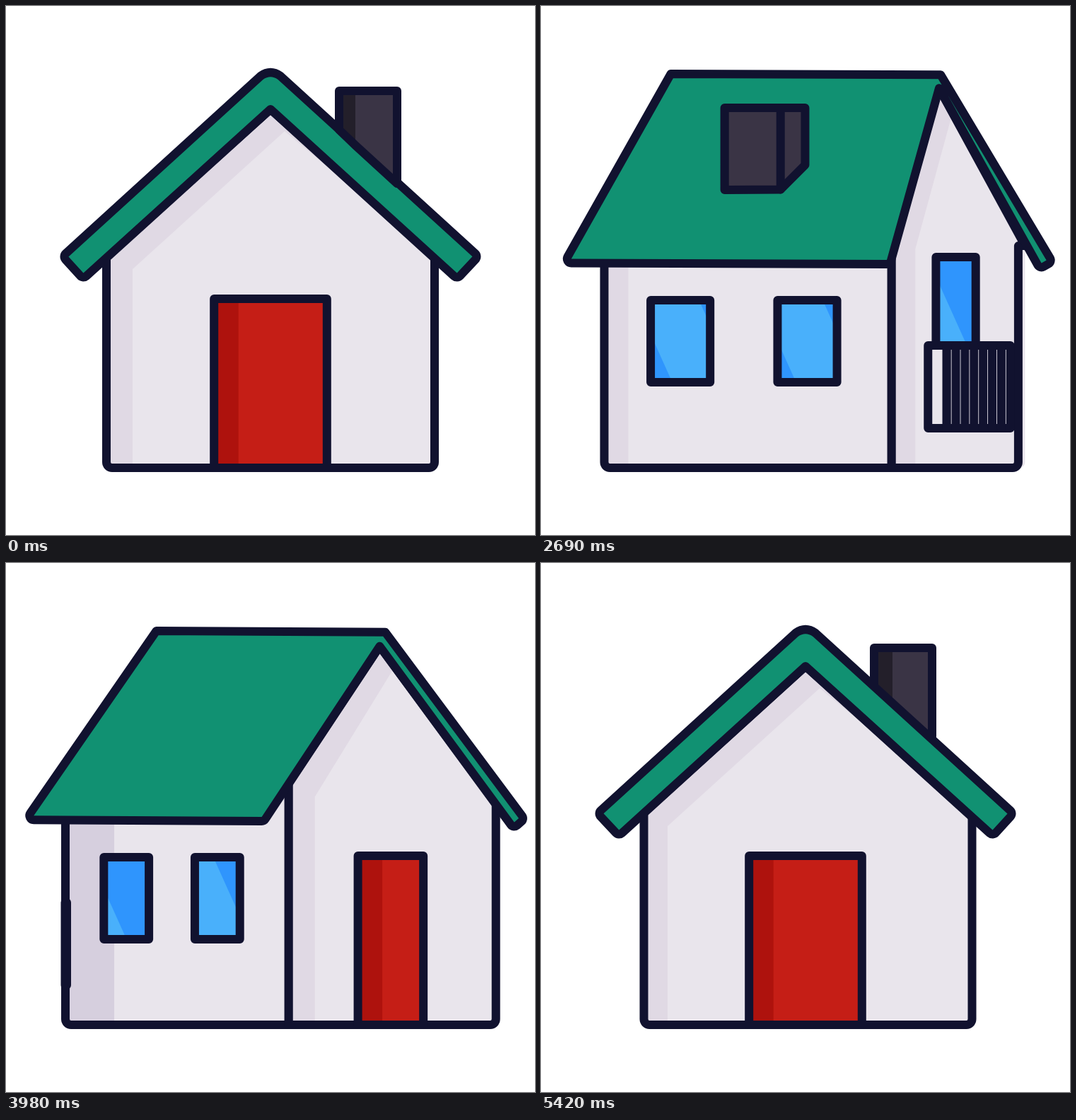
Recreate the animation shown at these times as an HTML page with a canvas. Size 748 by 748 pixels, loop 5.45 s.

```html
<!DOCTYPE html>
<html lang="en">
<head>
<meta charset="utf-8">
<title>Turning house</title>
<style>
html, body { margin: 0; width: 100%; height: 100%; overflow: hidden; background: #fff; }
canvas { display: block; }
</style>
</head>
<body>
<canvas id="stage" width="748" height="748"></canvas>
<script>
const SIZE = 748, LOOP = 5450, STEP = 30, HOLD = 2030, TURN = 3420;
const INK = '#11122f', WALL = '#e9e5ec', SHADE = '#e0d9e4', DEEP = '#d6cfde', GREEN = '#119172',
      RED = '#c51e16', DARK_RED = '#ae120d', BLUE = '#2f95fd', LIGHT_BLUE = '#49b0fb',
      BRICK = '#3a3445', DARK_BRICK = '#231f2a';
const BASE = 653, ROUND = 8;
const ctx = document.getElementById('stage').getContext('2d');

// Each point seen head-on, at an eighth turn and at a quarter turn
const POSES = {
  near:     [[142, 353], [52, 343], [101, 334]],
  nearTop:  [[142, 353], [52, 343], [79, 334]],
  corner:   [[606, 353], [366, 309], [102, 345]],
  far:      [[606, 361], [665, 361], [650, 361]],
  apex:     [[374, 146], [226, 118], [131, 114]],
  eaveOut:  [[80, 354], [13, 362], [41, 361]],
  eaveLow:  [[109, 386], [28, 376], [62, 366]],
  sideLow:  [[638, 386], [407, 365], [53, 365]],
  sideFar:  [[668, 354], [721, 363], [708, 364]],
  ridgeIn:  [[360, 99], [217, 98], [138, 96]],
  ridgeOut: [[388, 99], [530, 96], [610, 96]],
  ridgeMid: [[374, 89], [373.5, 97], [374, 96]],
  stackA:   [[471, 175], [406, 198], [333, 260]],
  stackB:   [[494, 197], [467, 259], [333, 260]],
  stackC:   [[553, 251], [544, 260], [415, 260]],
  stackTop: [[0, 120], [0, 144], [0, 144]]
};

const lerp = (a, b, k) => a + (b - a) * k;
const clamp = (x, lo = 0, hi = 1) => Math.max(lo, Math.min(hi, x));

function ease(x) {
  let lo = 0, hi = 1;
  for (let i = 0; i < 30; i++) {
    const s = (lo + hi) / 2, r = 1 - s;
    if (3 * r * r * s * .191 + 3 * r * s * s * .239 + s ** 3 < x) lo = s; else hi = s;
  }
  return 3 * lo * lo - 2 * lo ** 3;
}

function paint(fill, stroke = true) {
  if (fill) { ctx.fillStyle = fill; ctx.fill(); }
  if (stroke) ctx.stroke();
}

// A point is [x, y] or [x, y, corner radius]
function poly(points, fill, stroke) {
  const [first] = points, last = points[points.length - 1];
  ctx.beginPath();
  ctx.moveTo((first[0] + last[0]) / 2, (first[1] + last[1]) / 2);
  points.forEach(([x, y, r = 0], i) => {
    const next = points[(i + 1) % points.length];
    ctx.arcTo(x, y, next[0], next[1], r);
  });
  ctx.closePath();
  paint(fill, stroke);
}

function box(l, t, r, b, fill, stroke) {
  poly([[l, t], [r, t], [r, b], [l, b]], fill, stroke);
}

function line(x1, y1, x2, y2) {
  ctx.beginPath();
  ctx.moveTo(x1, y1);
  ctx.lineTo(x2, y2);
  ctx.stroke();
}

// Glass with diagonal glints that drift as the house turns
function pane(l, t, r, b, turn) {
  ctx.save();
  ctx.beginPath();
  ctx.rect(l, t, r - l, b - t);
  ctx.clip();
  box(l, t, r, b, BLUE, false);
  const slant = y => (y - 422) * .45;
  for (let x = (95 + 32 * turn) % 175 - 175; x < SIZE; x += 175)
    poly([[x + slant(t), t], [x + 90 + slant(t), t], [x + 90 + slant(b), b], [x + slant(b), b]], LIGHT_BLUE, false);
  ctx.restore();
  box(l, t, r, b);
}

function door(l, r) {
  box(l, 414, r, BASE, RED, false);
  box(l, 414, Math.min(l + 34.5, r), BASE, DARK_RED, false);
  box(l, 414, r, BASE);
}

function balcony(l, r, dir, depth) {
  const root = dir < 0 ? r : l;
  l += dir * depth;
  r += dir * depth;
  box(root, 480, root + dir * depth, 597, WALL);
  box(l, 480, r, 597, WALL);
  for (let i = 1; i < 7; i++) line(lerp(l, r, i / 7), 480, lerp(l, r, i / 7), 597);
}

function roof(p) {
  const bend = (a, b) => ctx.arcTo(...a, ...b, 6);
  ctx.beginPath();
  ctx.moveTo(...p.ridgeIn);
  ctx.quadraticCurveTo(...p.ridgeMid, ...p.ridgeOut);
  bend(p.sideFar, p.sideLow);
  bend(p.sideLow, p.apex);
  ctx.lineTo(...p.apex);
  bend(p.eaveLow, p.eaveOut);
  bend(p.eaveOut, p.ridgeIn);
  ctx.closePath();
  paint(GREEN);
}

// turn counts quarter turns, 0 to 4
function draw(turn) {
  const second = turn >= 2, v = second ? turn - 2 : turn;
  const flip = v > 1, w = flip ? 2 - v : v;
  const half = clamp(w * 2), rest = clamp(w * 2 - 1);
  const showsBack = turn > 1 && turn <= 3;
  const drift = 7 * Math.max(0, turn - 3.5);
  const mirror = x => flip ? SIZE - x : x;
  const p = {};
  for (const name in POSES) {
    const [a, b, c] = POSES[name];
    const mix = i => w < .5 ? lerp(a[i], b[i], half) : lerp(b[i], c[i], rest);
    p[name] = [mirror(mix(0)), mix(1)];
  }
  const shift = q => [q[0] + drift, q[1]];
  const foot = (q, r) => [q[0], BASE, r];
  const near = shift(p.near), nearTop = shift(p.nearTop), far = shift(p.far);
  // The shared edge never passes the outer edge of the side
  const corner = drift ? [Math.max(p.corner[0], far[0]), p.corner[1]] : p.corner;

  ctx.fillStyle = '#fff';
  ctx.fillRect(0, 0, SIZE, SIZE);
  ctx.strokeStyle = INK;
  ctx.lineWidth = 12;
  ctx.lineJoin = ctx.lineCap = 'round';

  // Chimney behind the ridge
  if (second && w < .5) {
    const edge = 553 - 84 * w, top = 120 + 74 * w;
    const l = flip ? edge - 82 : SIZE - edge;
    box(l, top, l + 82, 245, BRICK, false);
    box(l, top, l + 26, 245, DARK_BRICK, false);
    box(l, top, l + 82, 245);
  }

  // Long side
  if (w > 0) {
    const sl = Math.min(corner[0], far[0]), sr = Math.max(corner[0], far[0]);
    const tone = second ? DEEP : SHADE;
    const side = [corner, far, foot(far, Math.min(ROUND, (sr - sl) / 2)), foot(corner)];
    const band = clamp(second ? 28 + 88 * Math.max(0, v - 1) : 34, 0, Math.max(0, sr - sl - 26));
    const at = (a, b) => lerp(corner[0], far[0], lerp(a, b, rest));
    ctx.globalAlpha = clamp(w / .08);
    poly(side, WALL, false);
    box(sl, 361, sl + band, BASE - 4, tone, false);
    if (!flip && band) poly([corner, [sl + band, 361], [sl, 361]], tone, false);
    poly(side);
    for (const [x1, x2] of [[at(.224, .145), at(.425, .36)], [at(.625, .64), at(.826, .855)]])
      pane(Math.min(x1, x2), 416, Math.max(x1, x2), 532, turn);
    ctx.globalAlpha = 1;
  }

  // Gable end
  const gable = [foot(near, Math.min(ROUND, Math.abs(corner[0] - near[0]) / 2)), near, nearTop,
    p.apex, corner, foot(corner, clamp(ROUND - 100 * w, 0, ROUND))];
  const gl = Math.min(p.near[0], p.corner[0]), gw = Math.abs(p.corner[0] - p.near[0]);
  const [leftTop, rightTop] = flip ? [corner, nearTop] : [nearTop, corner];
  const band = 37 * clamp((gw - 43) / 150);
  poly(gable, band ? SHADE : WALL, false);
  if (band) poly([[gl + band, BASE], [gl + band, leftTop[1] + 19], [p.apex[0] + 20, p.apex[1] + 31],
    rightTop, foot(rightTop, ROUND)], WALL, false);
  poly(gable);

  // Places along the gable, measured from its near edge, in order from left to right
  const span = (...parts) => parts.map(k => lerp(p.near[0], p.corner[0], k)).sort((a, b) => a - b);
  const dir = flip ? 1 : -1;
  if (showsBack) {
    const [l, r] = span(.336, .65);
    pane(l, 355, r, 480, turn);
    balcony(...span(.21, lerp(.79, .61, rest)), dir, 37 * w);
  } else {
    door(...span(lerp(.328, .35, half), lerp(.672, .666, half)));
    if (w > .45) {
      const x = p.far[0] + dir * 2;
      box(x, 480, x - dir * 37 * rest, 597, WALL);
    }
  }

  roof(p);

  // Chimney on the visible slope
  if (!second) {
    const top = p.stackTop[1], { stackA: a, stackB: b, stackC: c } = p;
    const up = q => [q[0], top];
    poly([up(a), up(c), c, b, a], BRICK, false);
    if (!flip) poly([up(a), up(b), b, a], DARK_BRICK, false);
    else box(c[0], top, c[0] + 21 * (v - 1), lerp(c[1], b[1], .3), DARK_BRICK, false);
    ctx.globalAlpha = clamp((w - .05) / .1);
    line(b[0], top, b[0], b[1]);
    ctx.globalAlpha = 1;
    poly([up(a), up(c), c, b, a]);
  }
}

const start = performance.now();

function frame(now) {
  const t = Math.max(0, now - start) % LOOP;
  const tick = Math.floor((t - HOLD) / STEP) * STEP;
  draw(t < HOLD ? 0 : tick + STEP >= TURN ? 4 : 4 * ease((tick + STEP) / TURN));
  requestAnimationFrame(frame);
}
frame(start);
</script>
</body>
</html>
```
